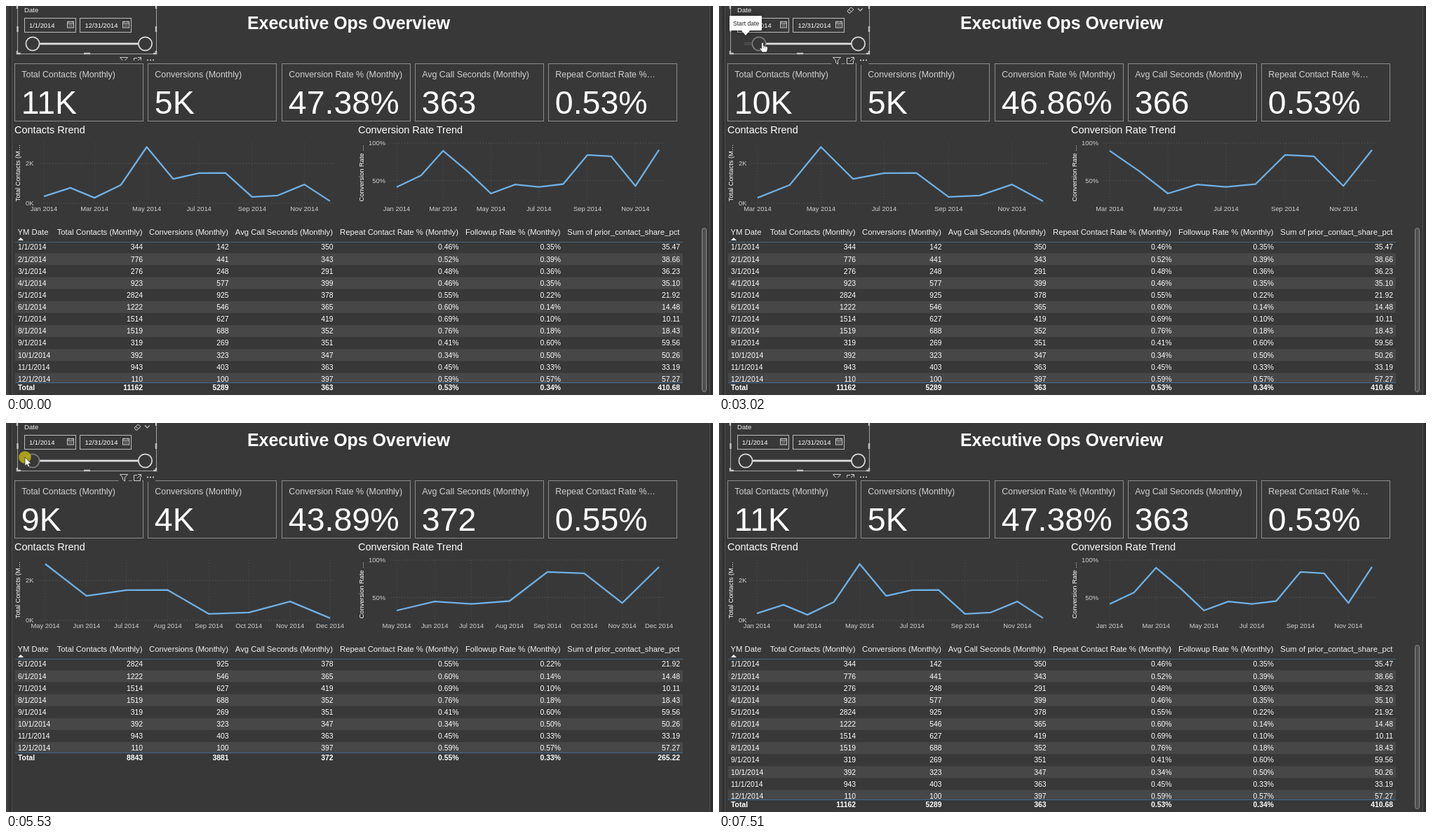
Recreate the animation shown at these times as an HTML page. Size 1008 px wide and 556 px high, loop 8000 ms.

```html
<!DOCTYPE html>
<html lang="en">
<head>
<meta charset="utf-8">
<title>Executive Ops Overview</title>
<style>
html, body { margin: 0; width: 100%; height: 100%; overflow: hidden; background: #383838; }
svg { display: block; width: 1008px; height: 556px; font-family: "Liberation Sans", Arial, sans-serif; }
text { white-space: pre; }
</style>
</head>
<body>
<svg id="stage" viewBox="0 0 1008 556" xmlns="http://www.w3.org/2000/svg"></svg>
<script>
const LOOP = 8000, BG = '#383838';
const MONTHS = 'Jan Feb Mar Apr May Jun Jul Aug Sep Oct Nov Dec'.split(' ');
const DAYS = [0, 31, 59, 90, 120, 151, 181, 212, 243, 273, 304, 334];

// contacts, conversions, call seconds, repeat %, followup %, prior share
const DATA = [
  [344, 142, 350, .46, .35, 35.47], [776, 441, 343, .52, .39, 38.66],
  [276, 248, 291, .48, .36, 36.23], [923, 577, 399, .46, .35, 35.10],
  [2824, 925, 378, .55, .22, 21.92], [1222, 546, 365, .60, .14, 14.48],
  [1514, 627, 419, .69, .10, 10.11], [1519, 688, 352, .76, .18, 18.43],
  [319, 269, 351, .41, .60, 59.56], [392, 323, 347, .34, .50, 50.26],
  [943, 403, 363, .45, .33, 33.19], [110, 100, 397, .59, .57, 57.27]
];
// averages by first month: call seconds, repeat %, followup %
const AVG = { 0: [363, .53, .34], 2: [366, .53, .34], 4: [372, .55, .33] };
const STARTS = [0, 2, 4];

const text = (x, y, s, size, fill = '#fff', extra = '') =>
  `<text x="${x}" y="${y}" font-size="${size}" fill="${fill}" ${extra}>${s}</text>`;
const END = 'text-anchor="end"', MID = 'text-anchor="middle"', BOLD = 'font-weight="bold"';
const rect = (x, y, w, h, fill, extra = '') =>
  `<rect x="${x}" y="${y}" width="${w}" height="${h}" fill="${fill}" ${extra}/>`;
const frame = (x, y, w, h, color, extra = '') =>
  rect(x, y, w, h, 'none', `stroke="${color}" ${extra}`);
const path = (d, color, width = 1, extra = '') =>
  `<path d="${d}" fill="none" stroke="${color}" stroke-width="${width}" ${extra}/>`;
const group = (id, body, extra = '') => `<g id="${id}" ${extra}>${body}</g>`;
const sum = (rows, i) => rows.reduce((a, r) => a + r[i], 0);

function cards(start) {
  const rows = DATA.slice(start), [secs, repeat] = AVG[start];
  const total = sum(rows, 0), conv = sum(rows, 1);
  const list = [
    ['Total Contacts (Monthly)', Math.round(total / 1000) + 'K'],
    ['Conversions (Monthly)', Math.round(conv / 1000) + 'K'],
    ['Conversion Rate % (Monthly)', (conv / total * 100).toFixed(2) + '%'],
    ['Avg Call Seconds (Monthly)', secs],
    ['Repeat Contact Rate %…', repeat.toFixed(2) + '%']
  ];
  return list.map(([label, value], i) => {
    const x = 12.5 + Math.round(190.3 * i);
    return frame(x, 82.5, 183, 82, '#8c8c8c') +
      text(x + 9.8, 102, label, 12.4, '#d2d2d2') + text(x + 9.3, 154, value, 46.5);
  }).join('');
}

function chart(start, x0, x1, left, right, yOf, ticks, labelX) {
  const span = DAYS[11] - DAYS[start], step = start < 4 ? 2 : 1;
  const dots = 'stroke-dasharray="1 3"';
  const xOf = m => x0 + (DAYS[m] - DAYS[start]) / span * (x1 - x0);
  let out = '', line = [];
  for (const [y, label] of ticks) {
    out += path(`M${left} ${y}H${right}`, '#5c5c5c', 1, dots) +
      text(labelX, y + 3.3, label, 9.4, '#d0d0d0', END);
  }
  for (let m = start; m < 12; m++) {
    const x = xOf(m);
    line.push(x.toFixed(1) + ' ' + yOf(DATA[m]).toFixed(1));
    if ((m - start) % step) continue;
    out += path(`M${x.toFixed(1)} 196V282`, '#505050', 1, dots) +
      text(x, 293.3, MONTHS[m] + ' 2014', 9.4, '#d0d0d0', MID);
  }
  return out + path('M' + line.join('L'), '#6fb0e4', 2.3, 'stroke-linejoin="round"');
}

const charts = start =>
  chart(start, 54 + start / 2, 462, 46, 468, r => 282 - r[0] * .0285,
    [[225, '2K'], [282, '0K']], 39.5) +
  chart(start, 557, 931, 548, 940, r => 303 - r[1] / r[0] * 107,
    [[196, '100%'], [249.5, '50%']], 541);

const COLS = [195, 317.5, 466.5, 645.5, 791, 961];
function cells(first, values, y, extra = '') {
  const [a, b, c, d, e, f] = values;
  const show = [a, b, c, d.toFixed(2) + '%', e.toFixed(2) + '%', f.toFixed(2)];
  return text(17, y, first, 10.4, '#fff', extra) +
    show.map((s, i) => text(COLS[i], y, s, 10.4, '#fff', END + extra)).join('');
}

function table(start) {
  const rows = DATA.slice(start), n = rows.length, pitch = 17.13;
  let out = '';
  rows.forEach((r, i) => {
    const mid = 344.7 + pitch * i;
    if (i % 2) out += rect(13, (mid - 8.5).toFixed(1), 952, 17, '#474747');
    out += cells(`${start + i + 1}/1/2014`, r, (mid + 3.7).toFixed(1));
  });
  const mid = Math.min(545.5, 344.7 + pitch * (n - 1) + 13.8);
  const [secs, repeat, follow] = AVG[start];
  out += rect(13, mid - 6.5, 952, 17, BG) + path(`M13 ${mid - 7}H965`, '#3f6d96') +
    cells('Total', [sum(rows, 0), sum(rows, 1), secs, repeat, follow, sum(rows, 5)],
      (mid + 3.8).toFixed(1), ' ' + BOLD);
  if (n === 12) out += rect(992.5, 317.5, 6, 234, '#505050', 'rx="3" stroke="#8e8e8e"');
  return out;
}

const HEADS = ['Total Contacts (Monthly)', 'Conversions (Monthly)', 'Avg Call Seconds (Monthly)',
  'Repeat Contact Rate % (Monthly)', 'Followup Rate % (Monthly)', 'Sum of prior_contact_share_pct'];

const calendar = x => `<g transform="translate(${x} 21.5)">` +
  frame(.5, 1, 9, 8.5, '#c8c8c8') + path('M.5 3.5H9.5M2.5 0V2M7.5 0V2', '#c8c8c8') +
  path('M2.5 5.5H8M2.5 7.5H8', '#c8c8c8', 1, 'stroke-dasharray="1 1"') + '</g>';

const fixed =
  '<defs><linearGradient id="side"><stop stop-color="#444"/><stop offset="1" stop-color="#2c2c2c"/></linearGradient>' +
  '<clipPath id="crop"><rect x="155" y="70" width="65" height="8"/></clipPath></defs>' +
  rect(0, 0, 1008, 556, BG) + rect(0, 0, 8, 556, 'url(#side)') + path('M8.5 0V556', '#505050') +
  rect(1004, 0, 4, 556, '#2f2f2f') + path('M1003.5 0V556', '#505050') +
  text(344, 33, 'Executive Ops Overview', 24.9, '#fff', BOLD) +
  text(12, 182, 'Contacts Rrend', 14.5) + text(502, 182, 'Conversion Rate Trend', 14.5) +
  text(0, 0, 'Total Contacts (M…', 9.3, '#fff', 'transform="translate(19.5 279.5) rotate(-90)"') +
  text(0, 0, 'Conversion Rate …', 9.3, '#fff', 'transform="translate(509.5 279.5) rotate(-90)"') +
  text(16.5, 327.3, 'YM Date', 11.3, '#f2f2f2') +
  HEADS.map((s, i) => text(COLS[i] - .5, 327.3, s, 11.3, '#f2f2f2', END)).join('') +
  '<path d="M17 335L21 331L25 335Z" fill="#fff"/>' + path('M13 337.5H965', '#47667f');

const slicer =
  path('M16.5 0V68.5H214.5V0', '#a2a2a2') +
  path('M16.5 29V37M214 29V37M111 68H120M16 64V68H21M214 64V68H210M16 0V4M214 0V4', '#c4c4c4', 2.4) +
  text(26, 9, 'Date', 9.6, '#eee') +
  frame(26.5, 17.5, 73, 20, '#bdbdbd') + frame(105.5, 17.5, 73, 20, '#bdbdbd') +
  calendar(87) + calendar(166) +
  text(33, 31, '', 9.4, '#fff', 'id="from"') + text(112.5, 31, '12/31/2014', 9.4) +
  path('M36 52.7H198M36 55.2H198', '#606060') +
  path('', '#dedede', 2.6, 'id="track"') +
  `<circle id="knob" cy="54" r="9.6" fill="${BG}" stroke-width="1.8"/>` +
  `<circle cx="198.5" cy="54" r="9.6" fill="${BG}" stroke="#d8d8d8" stroke-width="1.8"/>`;

const icons = [160.5, 180, 199].map(x => rect(x, 71, 14, 13, BG)).join('') +
  path('M162.5 73.5H173.5L169.5 78V83L166.5 81V78Z', '#cfcfcf') +
  path('M187 74.5H182.5V82.5H191.5V78M188 73.5H192.5V77.5M192 74L187 79', '#cfcfcf') +
  [202, 206, 210].map(x => `<circle cx="${x}" cy="77.5" r="1.1" fill="#d8d8d8"/>`).join('');

const tools = path('M183 7L188 2L192 5L187 10H185Z M185 5L189 8.5', '#cfcfcf') +
  path('M198 3.5L201.3 7L204.6 3.5', '#cfcfcf', 1.1);

const tip = '<path d="M16 14H60Q61 14 61 15V34Q61 35 60 35H44L38 42L32 35H16Q15 35 15 34V15Q15 14 16 14Z" ' +
  'fill="#fff" style="filter:drop-shadow(0 0 3px rgba(0,0,0,.4))"/>' + text(20, 27.6, 'Start date', 8.6, '#222');

const arrow = '<path d="M0 0V12.5L2.9 9.8L4.8 14L6.8 13.1L5 9H8.8Z" fill="#fff" stroke="#222" stroke-width=".7"/>';
const hand = '<path d="M-1.3 1Q0 -.8 1.3 1V5L6 6Q7.6 6.4 7.5 8L6.8 11.5L6 14H-.3L-3.8 9.3Q-4.2 7.6 -2.6 8L-1.3 9Z" ' +
  'fill="#fff" stroke="#222" stroke-width=".7"/>' + path('M1.6 6V8.5M3.8 6.4V8.5', '#555', .6);

const VIEWS = { cards, charts, table };
const variants = (name, make) =>
  STARTS.map(s => group(name + s, make(s))).join('');

document.getElementById('stage').innerHTML = fixed +
  Object.entries(VIEWS).map(([k, f]) => variants(k, f)).join('') +
  frame(0, 0, 0, 0, '#c4c4c4', 'id="hover"') + slicer +
  group('icons', icons) + group('tools', tools) + group('tip', tip) +
  group('cursor', '<circle id="press" r="8.8" fill="#c3b414" fill-opacity=".82"/>' +
    group('arrow', arrow) + group('hand', hand));

const el = id => document.getElementById(id);
const show = (id, on) => { el(id).style.display = on ? '' : 'none'; };
const within = (t, ...spans) => spans.some(([a, b]) => t >= a && t < b);

// keys: [time, values...]; linear between, held outside
function track(keys, t) {
  let i = keys.findIndex(k => k[0] > t);
  if (i === 0) return keys[0].slice(1);
  if (i < 0) return keys[keys.length - 1].slice(1);
  const a = keys[i - 1], b = keys[i], p = (t - a[0]) / (b[0] - a[0]);
  return a.slice(1).map((v, j) => v + (b[j + 1] - v) * p);
}

const POINTER = [
  [1440, 112, 2], [1700, 84, 24], [1960, 52, 48], [2140, 41, 54], [2410, 41, 54],
  [2480, 42, 54], [2830, 62, 52], [3360, 62, 52], [3890, 63, 50], [4020, 63, 50],
  [4350, 88, 49], [5190, 88, 49], [5260, 80, 49], [5470, 30, 49], [5530, 27, 49],
  [6460, 27, 49], [6530, 47, 74], [6600, 71, 105], [6670, 92, 142], [6880, 150, 270],
  [7090, 205, 410], [7300, 240, 530], [7370, 244, 552]
];
const KNOB = [[2410, 38], [2480, 38], [2830, 57], [4020, 57], [4350, 86], [5190, 86], [5260, 78], [5440, 38]];

const firstMonth = t => t < 2900 ? 0 : t < 4470 ? 2 : t < 5990 ? 4 : 0;

function dateAt(x) {
  const d = new Date(2014, 0, 1 + Math.round((x - 38) / 160.5 * 364));
  return `${d.getMonth() + 1}/${d.getDate()}/2014`;
}

function outline(t, y) {
  if (!within(t, [6530, 7440])) return null;
  if (y < 78) return null;
  if (y < 168) return [8.5, 78.5, 954, 90];
  if (y < 310) return [8.5, 168.5, 474, 138];
  return [8.5, 312.5, 994, 243];
}

function draw(t) {
  Object.keys(VIEWS).forEach((name, i) => {
    const on = firstMonth(t - i * 70);
    STARTS.forEach(s => show(name + s, s === on));
  });

  const [x, y] = track(POINTER, t), [k] = track(KNOB, t);
  el('from').textContent = dateAt(k);
  el('track').setAttribute('d', `M${k} 54H198`);
  el('knob').setAttribute('cx', k);
  el('knob').setAttribute('stroke', within(t, [2070, 5720]) ? '#7c7c7c' : '#d8d8d8');

  const over = within(t, [1440, 7510]);
  if (over) el('icons').removeAttribute('clip-path');
  else el('icons').setAttribute('clip-path', 'url(#crop)');
  show('tools', within(t, [1440, 6530]));
  show('tip', within(t, [2140, 5330]));

  const box = outline(t, y);
  show('hover', box);
  if (box) ['x', 'y', 'width', 'height'].forEach((a, i) => el('hover').setAttribute(a, box[i]));

  const grab = within(t, [2070, 2410], [2900, 3360], [4530, 5190]);
  show('cursor', within(t, [1440, 7370]));
  show('press', within(t, [2410, 2830], [3890, 4400], [5190, 5720]));
  show('hand', grab);
  show('arrow', !grab);
  el('cursor').setAttribute('transform', `translate(${x.toFixed(1)} ${y.toFixed(1)})`);
}

const begin = performance.now();
function tick() {
  draw((performance.now() - begin) % LOOP);
  requestAnimationFrame(tick);
}
tick();
</script>
</body>
</html>
```
